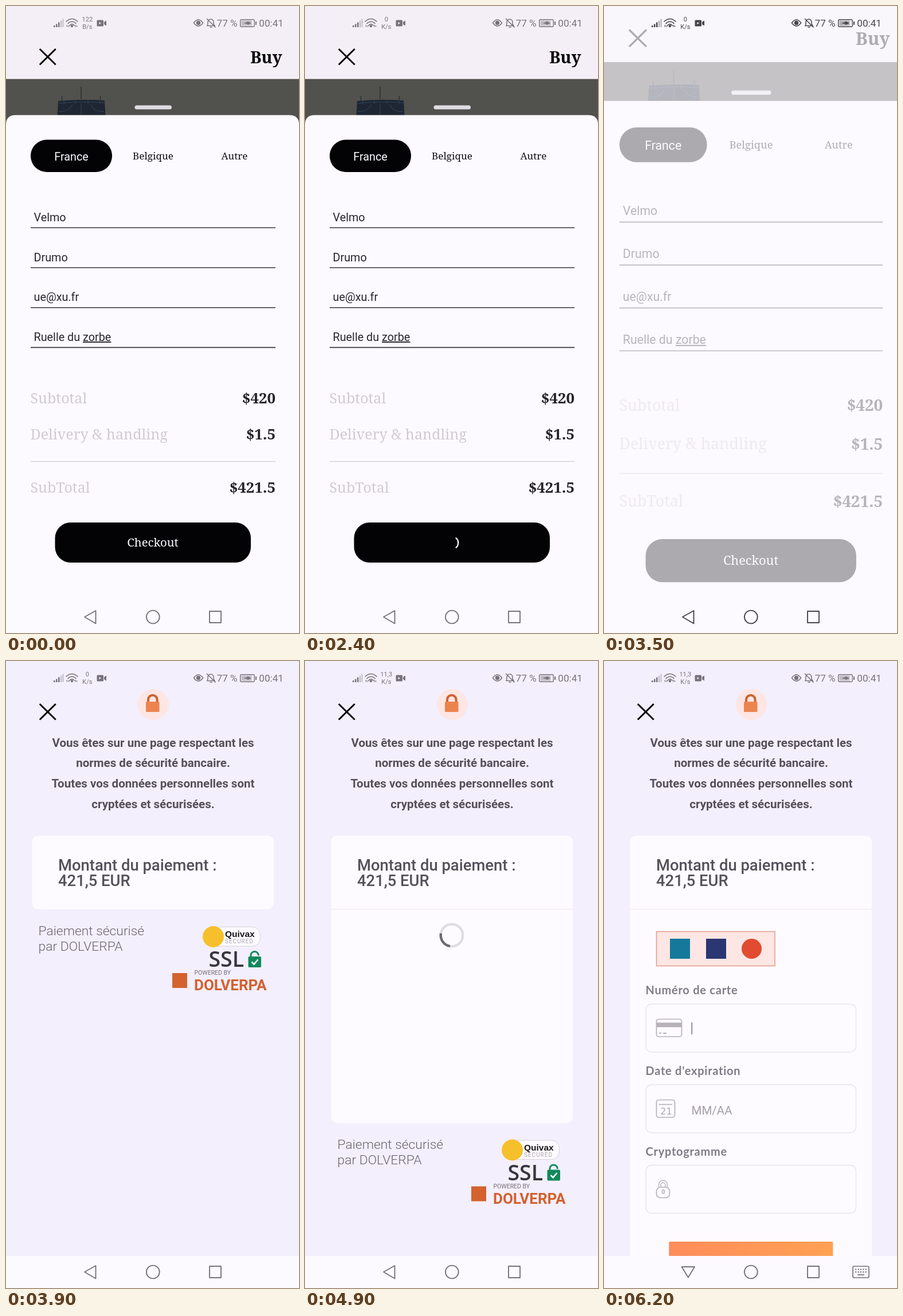
An HTML page that plays this animation: 511 by 1095 pixels, repeating every 6300 ms.

```html
<!DOCTYPE html>
<html lang="fr">
<head>
<meta charset="utf-8">
<title>Checkout</title>
<style>
html, body { margin: 0; width: 100%; height: 100%; overflow: hidden; background: #fdfaff; }
svg { display: block; width: 100%; height: 100%; }
text { font-family: Roboto, Arial, sans-serif; white-space: pre; }
.serif text, text.serif { font-family: "Noto Serif", "Liberation Serif", serif; }
.label text { font: 700 20px Lato, sans-serif; letter-spacing: .75px; fill: #807a86; }
.mid { text-anchor: middle; }
.end { text-anchor: end; }
.line { fill: none; stroke: currentColor; }
</style>
</head>
<body>
<svg viewBox="0 0 511 1095" preserveAspectRatio="none">
  <defs>
    <linearGradient id="orange"><stop stop-color="#fe8c5b"/><stop offset="1" stop-color="#ffa153"/></linearGradient>
  </defs>
  <rect width="511" height="1095" fill="#fdfaff"/>

  <g id="shop">
    <rect width="511" height="128" fill="#f4eff7"/>
    <rect y="127.5" width="511" height="90" fill="#51514d"/>
    <path d="M131 141V163M97.500 157V168M164.500 157V168" stroke="#2b2d31" stroke-width="1.400"/>
    <path d="M91 166Q131 162 172 165L174 200H89Z" fill="#1d2632"/>
    <path d="M92 170Q131 166 172 169M101 165V172M121 164V171M143 164V171M164 165V171M131 170V192M92 184Q108 186 116 172M148 172Q154 186 171 184" fill="none" stroke="#2e3d50" stroke-width="1.300"/>
    <path d="M0 1095V207Q0 190.500 17 190.500H494Q511 190.500 511 207V1095Z" fill="#fdfaff"/>
    <rect x="224.500" y="173.500" width="64.500" height="7" rx="3.500" fill="#dfdce2"/>
    <path d="M58.800 75L86.700 102.500M86.700 75L58.800 102.500" stroke="#050507" stroke-width="3"/>
    <text class="serif end" x="481.500" y="100" font-size="29" font-weight="600" fill="#0b0a0d">Buy</text>
    <rect x="43" y="233.500" width="142" height="56.500" rx="28" fill="#030306"/>
    <text class="mid" x="114" y="270" font-size="19.800" fill="#fdfaff">France</text>
    <g class="serif mid" font-size="17.100" fill="#111014">
      <text x="256.500" y="267.500">Belgique</text>
      <text x="398.500" y="267.500">Autre</text>
    </g>
    <g id="fields" font-size="19.800" fill="#29272c"></g>
    <g class="serif" font-size="25" fill="#d0cad4">
      <text x="42.500" y="693.500">Subtotal</text>
      <text x="42.500" y="756.500">Delivery &amp; handling</text>
      <text x="42.500" y="849.500">SubTotal</text>
    </g>
    <g class="serif end" font-size="26" font-weight="700" fill="#242227">
      <text x="470" y="694">$420</text>
      <text x="470" y="757">$1.5</text>
      <text x="470" y="850">$421.5</text>
    </g>
    <path d="M43 795.500H470" stroke="#d6d2da" stroke-width="1.400"/>
    <rect x="85.500" y="902" width="341.500" height="70" rx="27" fill="#030306"/>
    <text id="checkout" class="serif mid" x="256" y="943.500" font-size="20.300" fill="#fdfaff">Checkout</text>
    <path id="spinner" fill="none" stroke="#fdfaff" stroke-width="2.300"/>
  </g>
  <rect id="veil" width="511" height="1095" fill="#fdfaff"/>

  <g id="pay">
    <rect width="511" height="1039" fill="#f3effc"/>
    <path d="M58.800 75L86.700 102.500M86.700 75L58.800 102.500" stroke="#050507" stroke-width="3"/>
    <circle cx="257" cy="76" r="27" fill="#fde6e3"/>
    <path d="M248 73V67.500a7.800 7.800 0 0 1 15.600 0V73" fill="none" stroke="#cc6430" stroke-width="4"/>
    <rect x="244" y="71" width="23.500" height="18" rx="1.500" fill="#ec8450"/>
    <g class="mid" font-size="20.550" font-weight="700" fill="#55505b">
      <text x="256.500" y="149.700">Vous êtes sur une page respectant les</text>
      <text x="256.500" y="185.300">normes de sécurité bancaire.</text>
      <text x="256.500" y="220.900">Toutes vos données personnelles sont</text>
      <text x="256.500" y="256.500">cryptées et sécurisées.</text>
    </g>
    <rect id="card" x="45.500" y="305" width="421.500" rx="10" fill="#fdfbff"/>
    <g font-size="27.400" font-weight="500" fill="#55505b">
      <text x="91" y="366">Montant du paiement :</text>
      <text x="91" y="393">421,5 EUR</text>
    </g>
    <path id="divider" d="M45.500 433.500H467" stroke="#f2ecf5" stroke-width="1.300"/>
    <g id="loader" fill="none" stroke-width="4.300">
      <circle cx="256" cy="479" r="19.300" stroke="#dedbe3"/>
      <path id="sweep" stroke="#6d6972"/>
    </g>

    <g id="trust">
      <g font-size="22.850" font-weight="300" fill="#6a6470">
        <text x="56.500" y="479">Paiement sécurisé</text>
        <text x="56.500" y="506">par DOLVERPA</text>
      </g>
      <rect x="350" y="464.500" width="93.500" height="33.500" rx="14" fill="#fdfbff" stroke="#d7d2dc"/>
      <circle cx="361.500" cy="481.500" r="18.500" fill="#f6c02c"/>
      <text x="382" y="482" font-size="15.500" font-weight="700" fill="#1a181b" style="font-family:'Liberation Sans',sans-serif">Quivax</text>
      <text x="382" y="493" font-size="10" letter-spacing="1" fill="#aaa5ae">SECURED</text>
      <text x="353.500" y="534" font-size="37.500" font-weight="600" fill="#37353d" style="font-family:'Open Sans',sans-serif">SSL</text>
      <path d="M427 517V513.500a6.600 6 0 0 1 13.200 0V514.500" fill="none" stroke="#16885c" stroke-width="3"/>
      <rect x="422.500" y="516" width="22.500" height="19" rx="2" fill="#118a5b"/>
      <path d="M428.500 525.500L432.500 529.500L439.500 521.500" fill="none" stroke="#fff" stroke-width="2.600"/>
      <text x="328.500" y="548" font-size="10.500" fill="#746f79">POWERED BY</text>
      <rect x="290" y="545" width="26" height="26" fill="#d4622f"/>
      <text x="328" y="575" font-size="26" font-weight="700" fill="#d4602e">DOLVERPA</text>
    </g>

    <g id="form">
      <rect x="91.500" y="472.500" width="206.500" height="60" fill="#fde6e3" stroke="#e39a8c" stroke-width="1.500"/>
      <rect x="115" y="485" width="35" height="35" fill="#15799b"/>
      <rect x="178" y="485" width="35" height="35" fill="#2b3672"/>
      <circle cx="257.500" cy="502.500" r="17.500" fill="#e04b31"/>
      <g class="label">
        <text x="72.500" y="582">Numéro de carte</text>
        <text x="72.500" y="723">Date d'expiration</text>
        <text x="72.500" y="864">Cryptogramme</text>
      </g>
      <g class="line" color="#e8e3ec" stroke-width="1.400">
        <rect x="73" y="599" width="366.500" height="84" rx="10"/>
        <rect x="73" y="740" width="366.500" height="84" rx="10"/>
        <rect x="73" y="880.500" width="366.500" height="84" rx="10"/>
      </g>
      <g class="line" color="#b7b1ba" stroke-width="1.700">
        <rect x="91.500" y="625.500" width="44" height="30.500" rx="4"/>
        <path d="M92 635.500H135" stroke-width="8"/>
        <path d="M96 650H100M103 650H109" stroke-width="2.200"/>
        <rect x="91.500" y="766.500" width="32" height="30.500" rx="4"/>
        <path d="M96 774.500H119"/>
        <rect x="91.500" y="919" width="23" height="18.500" rx="7"/>
        <path d="M95.500 919V914.500a7.500 7.500 0 0 1 15 0V919M99 919V915a4 4 0 0 1 8 0V919" stroke-width="1.400"/>
        <rect x="101.500" y="923.500" width="3.500" height="6.500" rx="1.500"/>
      </g>
      <text class="mid" x="108.500" y="792" font-size="16" fill="#aea8b2" style="font-family:'DejaVu Sans',sans-serif">21</text>
      <text x="152.500" y="791.500" font-size="20.500" fill="#a59faa">MM/AA</text>
      <path id="caret" d="M153.300 631V652" stroke="#77717b" stroke-width="1.500"/>
      <rect x="113.300" y="1014" width="286" height="26" rx="1.500" fill="url(#orange)"/>
    </g>
    <rect y="1039" width="511" height="56" fill="#fdfaff"/>
  </g>

  <g id="system" fill="currentColor">
    <path d="M83 34h2.500v3h-2.500zM87 31.500h2.500v5.500h-2.500zM91 28.500h2.500v8.500h-2.500z"/>
    <path d="M95 25.500h2.200v11.500h-2.200zM98.500 22.500h2v14.500h-2z" opacity=".4"/>
    <g class="line" stroke-width="1.600">
      <path d="M104.500 27.500Q115 17.500 125.500 27.500M107.500 31Q115 23.500 122.500 31"/>
      <path d="M110.500 34.500Q115 28.500 119.500 34.500M106.500 36.500V33M109.500 36.500V34M121 36.500V33M123.500 36.500V34" stroke-width="1.300"/>
    </g>
    <circle cx="115" cy="35" r="2.200"/>
    <g class="mid" font-size="11">
      <text id="rate" x="141.800" y="27"></text>
      <text id="unit" x="141.800" y="40"></text>
    </g>
    <path fill-rule="evenodd" d="M160 24.500h8.500a1.500 1.500 0 0 1 1.500 1.500v8a1.500 1.500 0 0 1-1.500 1.500h-8.500a1.500 1.500 0 0 1-1.500-1.500v-8a1.500 1.500 0 0 1 1.500-1.500zM162.500 28v4l3.500-2zM171 28l4-2.500v9l-4-2.500z"/>
    <path class="line" stroke-width="1.500" d="M327.500 29.500Q335.500 18.500 343.500 29.500Q335.500 40.500 327.500 29.500Z"/>
    <circle cx="335.500" cy="29.500" r="3.700"/>
    <path class="line" stroke-width="1.500" d="M351 34.500H364L362 31.500V28a5 5 0 0 0-10 0V31.500ZM355.500 37H359.500M350 22L365.500 37.500"/>
    <text x="367.500" y="36" font-size="17.200">77 %</text>
    <rect class="line" x="408.700" y="23.700" width="24.500" height="12.500" rx="2" stroke-width="1.400"/>
    <rect x="410.500" y="25.500" width="18" height="9" opacity=".4"/>
    <path d="M414 30L421 28V26.500L428 30L421 33V31.500ZM435 27h2v6h-2z"/>
    <text x="441.300" y="36" font-size="17.100">00:41</text>
    <g class="line" stroke-width="1.900" stroke-linejoin="round">
      <path id="back"/>
      <circle cx="256.300" cy="1067" r="11.400"/>
      <rect x="355" y="1057" width="20" height="20"/>
      <g id="keys" stroke-width="1.700">
        <rect x="434" y="1057" width="28" height="20" rx="2.500"/>
        <path d="M438 1062.500H458M438 1067H458" stroke-width="2.200" stroke-dasharray="2.300 2.100"/>
        <path d="M442 1072H454"/>
      </g>
    </g>
  </g>
</svg>
<script>
const LOOP = 6300, STEP = 100;
const $ = id => document.getElementById(id);
const set = (id, key, value) => $(id).setAttribute(key, value);
const show = (id, on) => set(id, 'display', on ? 'inline' : 'none');
const clamp = v => Math.min(1, Math.max(0, v));
const ease = v => { v = clamp(v); return v * v * (3 - 2 * v); };

// Form rows; the last word of the address is underlined by the keyboard.
['Velmo', 'Drumo', 'ue@xu.fr', 'Ruelle du <tspan text-decoration="underline">zorbe</tspan>'].forEach((label, i) => {
  const y = 387.3 + i * 69.7;
  $('fields').innerHTML += `<text x="48.500" y="${y - 11.5}">${label}</text>` +
    `<path d="M43 ${y}H470" stroke="#39363c" stroke-width="1.600"/>`;
});

function arc(cx, cy, r, from, to) {
  const at = deg => {
    const a = deg * Math.PI / 180;
    return `${cx + r * Math.cos(a)} ${cy + r * Math.sin(a)}`;
  };
  return `M${at(from)}A${r} ${r} 0 ${to - from > 180 ? 1 : 0} 1 ${at(to)}`;
}

// Growing and shrinking arc that keeps turning.
function busyArc(t) {
  const n = (t - 2150) / 1333, turn = Math.floor(n), u = n - turn;
  const tail = 270 * (turn + ease(u * 2 - 1));
  const head = 270 * (turn + ease(u * 2)) + 20;
  const spin = -53 + (t - 2400) * .2;
  return arc(256, 937.5, 11.2, tail + spin, head + spin);
}

function draw(t) {
  const busy = t >= 1900 && t < 3300;
  const pay = t >= 3800, open = t >= 4300, form = t >= 5100, typing = t >= 6100;

  show('checkout', !busy);
  show('spinner', busy);
  if (busy) set('spinner', 'd', busyArc(t));

  const leave = Math.max(0, (t - 3400) / 100);
  const scale = 1 + .0755 * Math.min(leave, 1.4);
  set('shop', 'transform', `translate(256 519) scale(${scale}) translate(-256 -519)`);
  set('veil', 'opacity', clamp(leave * .68));
  show('shop', !pay);

  show('pay', pay);
  set('card', 'height', form ? 760 : open ? 502 : 128.5);
  show('divider', open);
  show('loader', open && !form);
  const turn = (t - 4900) * .36;
  set('sweep', 'd', arc(256, 479, 19.3, 99 + turn, 190 + turn));
  show('trust', !form);
  set('trust', 'transform', `translate(0 ${open ? 372.5 : 0})`);
  show('form', form);
  show('caret', typing);

  const [rate, unit] = t < 1000 ? ['122', 'B/s'] : open ? ['11,3', 'K/s'] : ['0', 'K/s'];
  $('rate').textContent = rate;
  $('unit').textContent = unit;
  set('system', 'color', leave > 0 && !pay ? '#48444b' : '#78727c');
  set('back', 'd', typing ? 'M135.500 1058H158L146.800 1076.500Z' : 'M137 1067L156.500 1056V1078.500Z');
  show('keys', typing);
}

const start = performance.now();
function tick(now) {
  const t = Math.max(0, now - start) % LOOP;
  draw(Math.floor(t / STEP) * STEP);
  requestAnimationFrame(tick);
}
draw(0);
requestAnimationFrame(tick);
</script>
</body>
</html>
```
